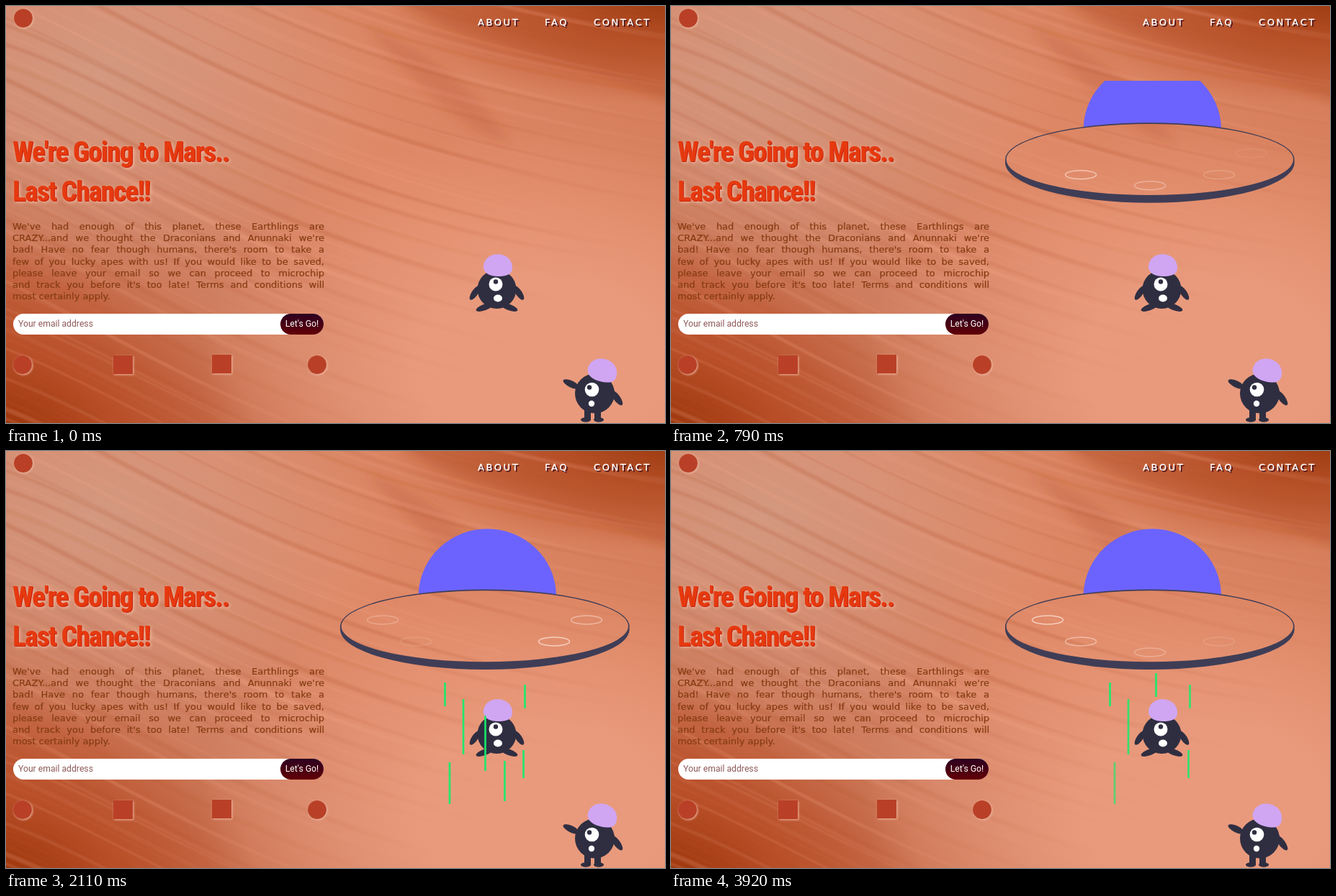
Recreate the animation shown at these times as an HTML page. Size 915 px wide and 580 px high, loop 3.95 s.

```html
<!DOCTYPE html>
<html lang="en">
<head>
<meta charset="utf-8">
<title>Going to Mars</title>
<style>
html, body { margin: 0; width: 915px; height: 580px; overflow: hidden; }
body {
  position: relative;
  background:
    radial-gradient(ellipse 400px 150px at 930px -10px, #9c380e 5%, #b84c24cc 45%, #cc623800),
    radial-gradient(ellipse 380px 290px at -30px 620px, #983207 5%, #b64a23cc 50%, #cc694500),
    radial-gradient(ellipse 470px 330px at 740px 500px, #e99a7c 35%, #e8977a00),
    radial-gradient(ellipse 420px 300px at 130px 90px, #d39880, #d3988000),
    linear-gradient(38deg, #bd5630, #d08062 32%, #df8967 58%, #d47b57);
}
svg, h1, p, nav a, .field, .button { position: absolute; margin: 0; }
svg { left: 0; top: 0; }
h1 {
  left: 9px; top: 175px; white-space: pre;
  font: 700 40px/55px Oswald, "Roboto Condensed", "Open Sans Condensed", "Noto Sans", sans-serif;
  font-stretch: 62.5%; letter-spacing: -.04em; color: #e6390f;
  text-shadow: 1px 1px 0 #c9200c, 2px 2px 5px #f4c0a8;
}
nav a {
  top: 14px; font: 13px/18px "DejaVu Sans", sans-serif; letter-spacing: 2.6px;
  color: #fff; text-shadow: 2px 2px 0 #3a0a1c; -webkit-text-stroke: .3px;
}
p {
  left: 9px; top: 299px; width: 433px; color: #853c12;
  font: 13px/16.2px "DejaVu Sans", sans-serif; -webkit-text-stroke: .2px;
}
p span { display: block; white-space: nowrap; text-align-last: justify; }
p span:last-child { text-align-last: left; }
.field, .button { top: 428px; height: 29px; border-radius: 15px; font: 12.2px/29px Roboto, sans-serif; }
.field { left: 10px; width: 424px; padding-left: 7px; background: #fff; color: #8d5a58; }
.button { left: 381px; width: 60px; text-align: center; color: #fff; background: linear-gradient(#2c0020, #620007); }
</style>
</head>
<body>
<svg width="915" height="580" viewBox="0 0 915 580">
  <defs>
    <clipPath id="sky"><path d="M0 104H915V580H0z"/></clipPath>
    <linearGradient id="fade" gradientUnits="userSpaceOnUse" x1="460" y1="300" x2="640" y2="520">
      <stop stop-color="#fff"/><stop offset="1" stop-color="#000"/>
    </linearGradient>
    <mask id="plain" maskUnits="userSpaceOnUse" x="0" y="0" width="915" height="580">
      <path fill="url(#fade)" d="M0 0H915V580H0z"/>
    </mask>
    <filter id="soft"><feGaussianBlur stdDeviation="1"/></filter>
    <filter id="haze"><feGaussianBlur stdDeviation="7"/></filter>
    <filter id="glow" x="-30%" y="-30%" width="160%" height="160%">
      <feDropShadow dx="1" dy="1" stdDeviation="1.5" flood-color="#f0b8a0"/>
    </filter>
  </defs>
  <g fill="#a84820" filter="url(#haze)">
    <path opacity=".3" d="M530 -20C600 50 760 60 935 140V-20z"/>
    <path opacity=".2" d="M500 30C590 60 650 110 700 190C640 180 590 130 500 30z"/>
  </g>
  <g mask="url(#plain)"><g id="streaks" fill="none" filter="url(#soft)"/></g>
  <g fill="#b94026" filter="url(#glow)">
    <circle cx="24" cy="17" r="13"/>
    <circle cx="23" cy="499" r="13"/>
    <rect x="149" y="486" width="27" height="26"/>
    <rect x="286" y="485" width="27" height="26"/>
    <circle cx="432" cy="499" r="13"/>
  </g>
  <g clip-path="url(#sky)">
    <g id="ship">
      <path fill="#6c63ff" d="M572.7 198.7A95.7 94 0 0 1 764 199.7A201 51 0 0 0 572.7 198.7z"/>
      <path fill="#3f3d56" fill-rule="evenodd" d="M464 244A200.8 51.5 0 0 1 865.6 244V248A200.8 56 0 0 1 464 248z
        M465.6 243.7A199.2 49.5 0 0 0 864 243.7A199.2 49.5 0 0 0 465.6 243.7z"/>
      <g id="lights" fill="none" stroke="#fbe0d5" stroke-width="1.5"/>
    </g>
  </g>
  <g fill="#2f2e41">
    <ellipse cx="651" cy="399" rx="4.3" ry="11.5" transform="rotate(34 651 399)"/>
    <ellipse cx="712" cy="399" rx="4.3" ry="11.5" transform="rotate(-34 712 399)"/>
    <ellipse cx="664.5" cy="419" rx="12.5" ry="4.3" transform="rotate(-20 664.5 419)"/>
    <ellipse cx="698.5" cy="419" rx="12.5" ry="4.3" transform="rotate(20 698.5 419)"/>
    <circle cx="681.5" cy="394" r="27"/>
    <circle cx="680" cy="387" r="9.5" fill="#fff"/>
    <circle cx="680" cy="383.5" r="3.2"/>
    <ellipse cx="683" cy="406.5" rx="6" ry="5" fill="#fff"/>
    <path id="hat" fill="#d0a6f3" d="M663 364C662 339 703 339 703 364C703 374 694 376 683 376C672 376 664 372 663 364z"/>
  </g>
  <g fill="#2f2e41">
    <ellipse cx="785" cy="526" rx="12.5" ry="4.6" transform="rotate(26 785 526)"/>
    <ellipse cx="848" cy="545" rx="4.6" ry="12.5" transform="rotate(-36 848 545)"/>
    <path d="M803 560h9v16h-9zM817 560h9v16h-9z"/>
    <ellipse cx="805" cy="575.5" rx="7" ry="3.2"/>
    <ellipse cx="823" cy="575.5" rx="7" ry="3.2"/>
    <circle cx="817.5" cy="539" r="27.5"/>
    <circle cx="813.5" cy="533.5" r="9.8" fill="#fff"/>
    <circle cx="810" cy="530.5" r="3.2"/>
    <circle cx="813" cy="553" r="4.2" fill="#fff"/>
    <use href="#hat" transform="translate(828.5 506.5) rotate(14) scale(1.03) translate(-683 -360.5)"/>
  </g>
  <g id="beams" stroke="#17ec6c" stroke-width="2.7"/>
</svg>
<nav><a style="left:655px">ABOUT</a><a style="left:748px">FAQ</a><a style="left:816px">CONTACT</a></nav>
<h1>We're Going to Mars..
Last Chance!!</h1>
<p>
  <span>We've had enough of this planet, these Earthlings are</span>
  <span>CRAZY...and we thought the Draconians and Anunnaki we're</span>
  <span>bad! Have no fear though humans, there's room to take a</span>
  <span>few of you lucky apes with us! If you would like to be saved,</span>
  <span>please leave your email so we can proceed to microchip</span>
  <span>and track you before it's too late! Terms and conditions will</span>
  <span>most certainly apply.</span>
</p>
<div class="field">Your email address</div>
<div class="button">Let's Go!</div>
<script>
const LOOP = 3950, LANDED = 1423, PULSE = 530;
const $ = id => document.getElementById(id);
const frac = x => x - Math.floor(x);
const clamp = x => Math.min(1, Math.max(0, x));

function add(parent, tag, attrs) {
  const el = document.createElementNS('http://www.w3.org/2000/svg', tag);
  for (const k in attrs) el.setAttribute(k, attrs[k]);
  return parent.appendChild(el);
}

// Choose the largest heading size that suits the column in the available font
const heading = document.querySelector('h1');
heading.style.fontSize = Math.min(40, 40 * 301 / heading.offsetWidth) + 'px';

// Sandy ridges running down to the right
let seed = 7;
const random = () => (seed = seed * 16807 % 2147483647) / 2147483647;
for (let y = -420; y < 570; y += 14) {
  const bend = random() * 50;
  add($('streaks'), 'path', {
    d: `M-40 ${y}C200 ${y + 60 + bend} 380 ${y + 270} 960 ${y + 320 + bend}`,
    stroke: random() < .5 ? '#f2a88b' : '#b05028',
    'stroke-width': 1.5 + random() * 5,
    opacity: .08 + random() * .14
  });
}

const lights = [[523, 235], [569, 265], [665, 280], [761, 265], [806, 235]]
  .map(([cx, cy]) => add($('lights'), 'ellipse', { cx, cy, rx: 21.5, ry: 6 }));

// x, top, bottom, phase of full brightness, mean brightness
const beams = [
  [609.5, 322, 355, .2, 1.6], [635, 345, 422, .2, .7], [665.5, 368, 445, .82, .7],
  [673.5, 309, 342, .57, .7], [720.5, 325, 358, .2, .7], [718.5, 416, 455, .2, .7],
  [692.5, 431, 487, .82, .7], [616, 433, 491, .91, 1.7], [647.5, 467, 499, .72, 0]
].map(([x, y1, y2, peak, mean]) => ({ peak, mean, el: add($('beams'), 'line', { x1: x, x2: x, y1, y2 }) }));

function draw(now) {
  const t = now % LOOP;
  const left = Math.max(0, LANDED - t) / (LANDED - 240);
  $('ship').setAttribute('transform', `translate(0 ${-198 * left ** 3})`);
  lights.forEach((el, i) => {
    el.style.opacity = .9 * frac((t - 1270) / PULSE + .92 - i / 5) ** 1.5;
  });
  const power = clamp((t - LANDED) / 200);
  for (const { el, peak, mean } of beams) {
    const wave = Math.cos(2 * Math.PI * ((t - 2110) / PULSE - peak));
    el.style.opacity = .95 * power * clamp(mean + wave);
  }
}

const start = performance.now();
function tick() {
  draw(performance.now() - start);
  requestAnimationFrame(tick);
}
tick();
</script>
</body>
</html>
```
